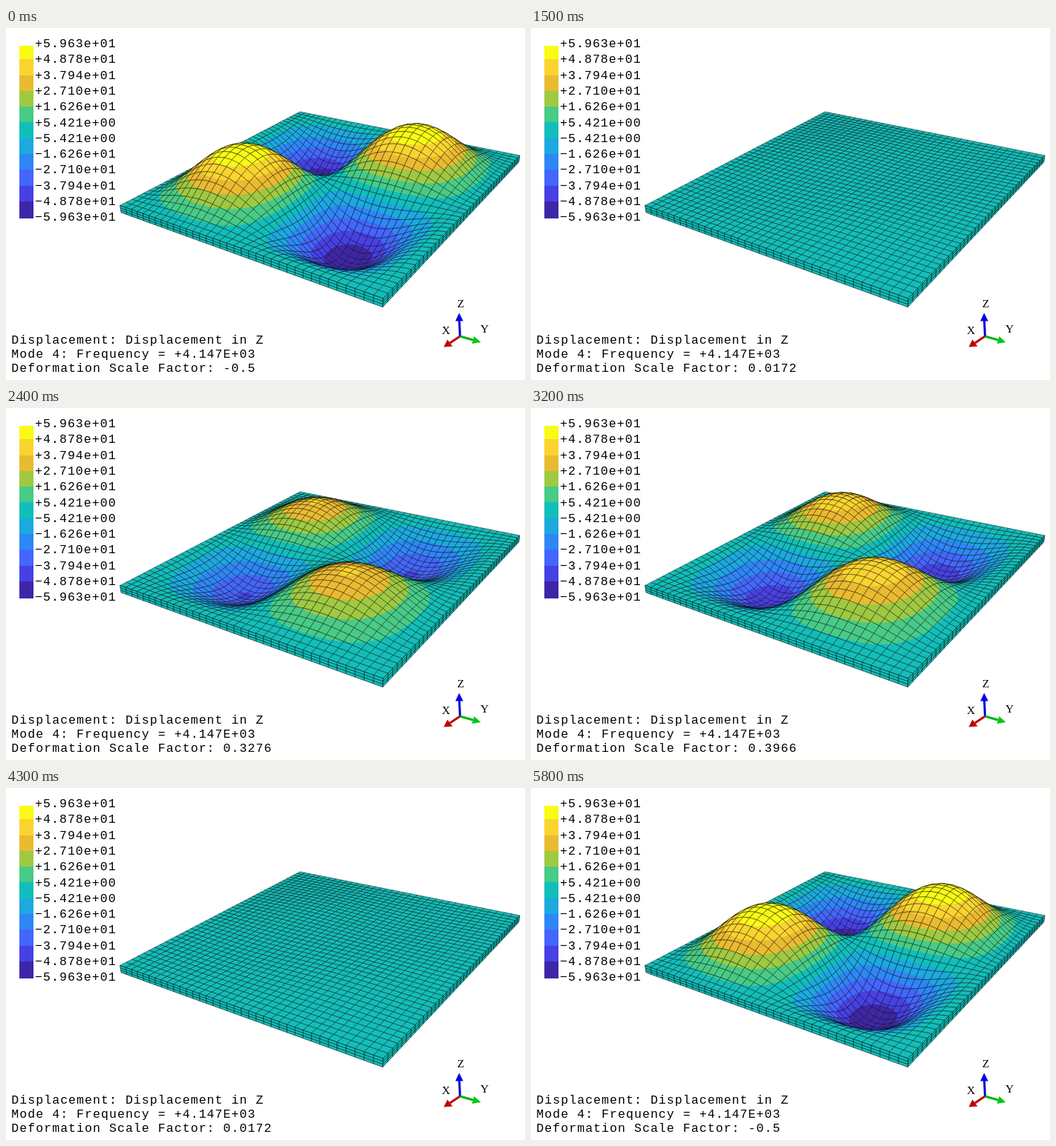
Recreate the animation shown at these times as an HTML page with a canvas. Size 699 by 475 pixels, loop 5.9 s.

```html
<!DOCTYPE html>
<html lang="en">
<head>
<meta charset="utf-8">
<title>Plate vibration mode</title>
<style>
  html, body { margin: 0; width: 100%; height: 100%; overflow: hidden; background: #fff; }
  canvas, svg { position: absolute; left: 0; top: 0; display: block; }
  text { font: 16.5px "Liberation Mono", "Courier New", monospace; letter-spacing: 1.07px; white-space: pre; }
  .axis { font: 15.5px "Liberation Serif", serif; letter-spacing: 0; text-anchor: middle; }
</style>
</head>
<body>
<canvas id="plate" width="699" height="475"></canvas>
<svg width="699" height="475" viewBox="0 0 699 475">
  <g id="legend"></g>
  <text x="7.3" y="426">Displacement: Displacement in Z</text>
  <text x="7.3" y="445">Mode 4: Frequency = +4.147E+03</text>
  <text x="7.3" y="464" id="factor"></text>
  <g stroke-width="3" fill="none">
    <path d="M611.5 416L610.5 394" stroke="#0000d8"/>
    <path d="M611.5 416L598 425" stroke="#c00000"/>
    <path d="M611.5 416L629 421" stroke="#00b414"/>
  </g>
  <path d="M610.3 384.5L615.8 395.5H605.2Z" fill="#0000e6"/>
  <path d="M589.5 430.5L594.5 420.5L601.5 429.5Z" fill="#c00000"/>
  <path d="M639.5 424L627.5 426L630.5 416Z" fill="#00c814"/>
  <text class="axis" x="612.5" y="377">Z</text>
  <text class="axis" x="592.5" y="413">X</text>
  <text class="axis" x="644.5" y="411">Y</text>
</svg>
<script>
const COLORS = ["#3e26a8", "#4741e5", "#4466fd", "#2e87f7", "#1ca9df", "#12beb9",
  "#48cb86", "#9fc941", "#eaba30", "#fad42e", "#f9fb15"];
const BANDS = COLORS.length, PEAK = 59.6258;
const CELLS_U = 40, CELLS_V = 36, LAYERS = 3;
const AMPLITUDE = 0.0248, THICKNESS = 0.0041;
const STEP_MS = 100, HALF_STEPS = 29, STEPS = 59;

const ctx = document.getElementById("plate").getContext("2d");
const factorText = document.getElementById("factor");

function buildLegend() {
  const rowY = i => 20.9 + i * 21.3;
  let markup = "";
  for (let i = 0; i < BANDS; i++) {
    const top = Math.max(24, rowY(i));
    const bottom = i === BANDS - 1 ? 257 : rowY(i + 1);
    markup += `<rect x="18" y="${top}" width="19" height="${bottom - top}" fill="${COLORS[BANDS - 1 - i]}" shape-rendering="crispEdges"/>`;
  }
  for (let i = 0; i <= BANDS; i++) {
    const value = PEAK * (1 - 2 * i / BANDS);
    const label = (value < 0 ? "\u2212" : "+") +
      Math.abs(value).toExponential(3).replace(/\+(\d)$/, "+0$1");
    markup += `<text x="39" y="${rowY(i) + 5.1}">${label}</text>`;
  }
  document.getElementById("legend").innerHTML = markup;
}

// Perspective camera: u and v span the plate, z is height.
function project(u, v, z) {
  const w = 1 - 0.25709 * u - 0.17738 * v - z;
  return {
    x: (396 - 281.96 * u + 173.25 * v - 426.8 * z) / w,
    y: (113 + 64.93 * u + 28.49 * v - 1978.5 * z) / w
  };
}

// Second bending shape of a clamped beam, softened a little by a sine.
function beam(p) {
  const y = 7.8532 * (p - 0.5);
  const clamped = (Math.sin(y) + 0.02788 * Math.sinh(y)) / 1.0668;
  return (0.9 * clamped + 0.1 * Math.sin(2 * Math.PI * (p - 0.5))) / 0.997;
}

function sampleBeam(cells) {
  const d = 1e-4;
  return Array.from({ length: cells + 1 }, (_, k) => {
    const p = k / cells;
    const slope = k % cells ? (beam(p + d) - beam(p - d)) / (2 * d) : 0;
    return { p, height: beam(p), slope };
  });
}
const alongU = sampleBeam(CELLS_U), alongV = sampleBeam(CELLS_V);

// The top face also tilts with the bending, shifting nodes sideways.
function node(a, b, load) {
  const value = load * a.height * b.height;
  const u = a.p - 0.00185 * load * a.slope * b.height;
  const v = b.p - 0.00228 * load * a.height * b.slope;
  return { ...project(u, v, AMPLITUDE * value), level: (value + 1) / 2 * BANDS };
}

function trace(points) {
  ctx.beginPath();
  for (const p of points) ctx.lineTo(p.x, p.y);
  ctx.closePath();
}

function clipAbove(points, level) {
  const kept = [];
  points.forEach((p, i) => {
    const q = points[(i + 1) % points.length];
    if (p.level >= level) kept.push(p);
    if ((p.level >= level) !== (q.level >= level)) {
      const k = (level - p.level) / (q.level - p.level);
      kept.push({ x: p.x + k * (q.x - p.x), y: p.y + k * (q.y - p.y), level });
    }
  });
  return kept;
}

const band = level => Math.max(0, Math.min(BANDS - 1, Math.floor(level)));

function drawCell(points) {
  const levels = points.map(p => p.level);
  const low = band(Math.min(...levels)), high = band(Math.max(...levels));
  for (let b = low; b <= high; b++) {
    trace(b === low ? points : clipAbove(points, b));
    ctx.fillStyle = COLORS[b];
    ctx.fill();
  }
  trace(points);
  ctx.stroke();
}

function drawSide(cells, edge) {
  const at = (k, layer) => {
    const [u, v] = edge(k / cells);
    return project(u, v, -THICKNESS * layer / LAYERS);
  };
  trace([at(0, 0), at(cells, 0), at(cells, LAYERS), at(0, LAYERS)]);
  ctx.fillStyle = COLORS[5];
  ctx.fill();
  ctx.beginPath();
  const line = (a, b) => { ctx.moveTo(a.x, a.y); ctx.lineTo(b.x, b.y); };
  for (let k = 0; k <= cells; k++) line(at(k, 0), at(k, LAYERS));
  for (let layer = 0; layer <= LAYERS; layer++) line(at(0, layer), at(cells, layer));
  ctx.stroke();
}

function draw(factor) {
  ctx.clearRect(0, 0, 699, 475);
  ctx.strokeStyle = "#000";
  ctx.lineWidth = 0.45;
  ctx.lineJoin = "round";
  const grid = alongU.map(a => alongV.map(b => node(a, b, 2 * factor)));
  // Far cells first, so nearer ones cover them.
  for (let i = 0; i < CELLS_U; i++)
    for (let j = 0; j < CELLS_V; j++)
      drawCell([grid[i][j], grid[i + 1][j], grid[i + 1][j + 1], grid[i][j + 1]]);
  ctx.lineWidth = 0.6;
  drawSide(CELLS_V, p => [1, p]);
  drawSide(CELLS_U, p => [p, 1]);
  factorText.textContent = "Deformation Scale Factor: " + Number(factor.toFixed(4));
}

let start = null, shown = -1;
function tick(now) {
  if (start === null) start = now;
  const step = Math.floor((now - start) / STEP_MS) % STEPS;
  if (step !== shown) {
    shown = step;
    draw(0.5 - Math.abs(HALF_STEPS - step) / HALF_STEPS);
  }
  requestAnimationFrame(tick);
}

buildLegend();
draw(-0.5);
requestAnimationFrame(tick);
</script>
</body>
</html>
```
